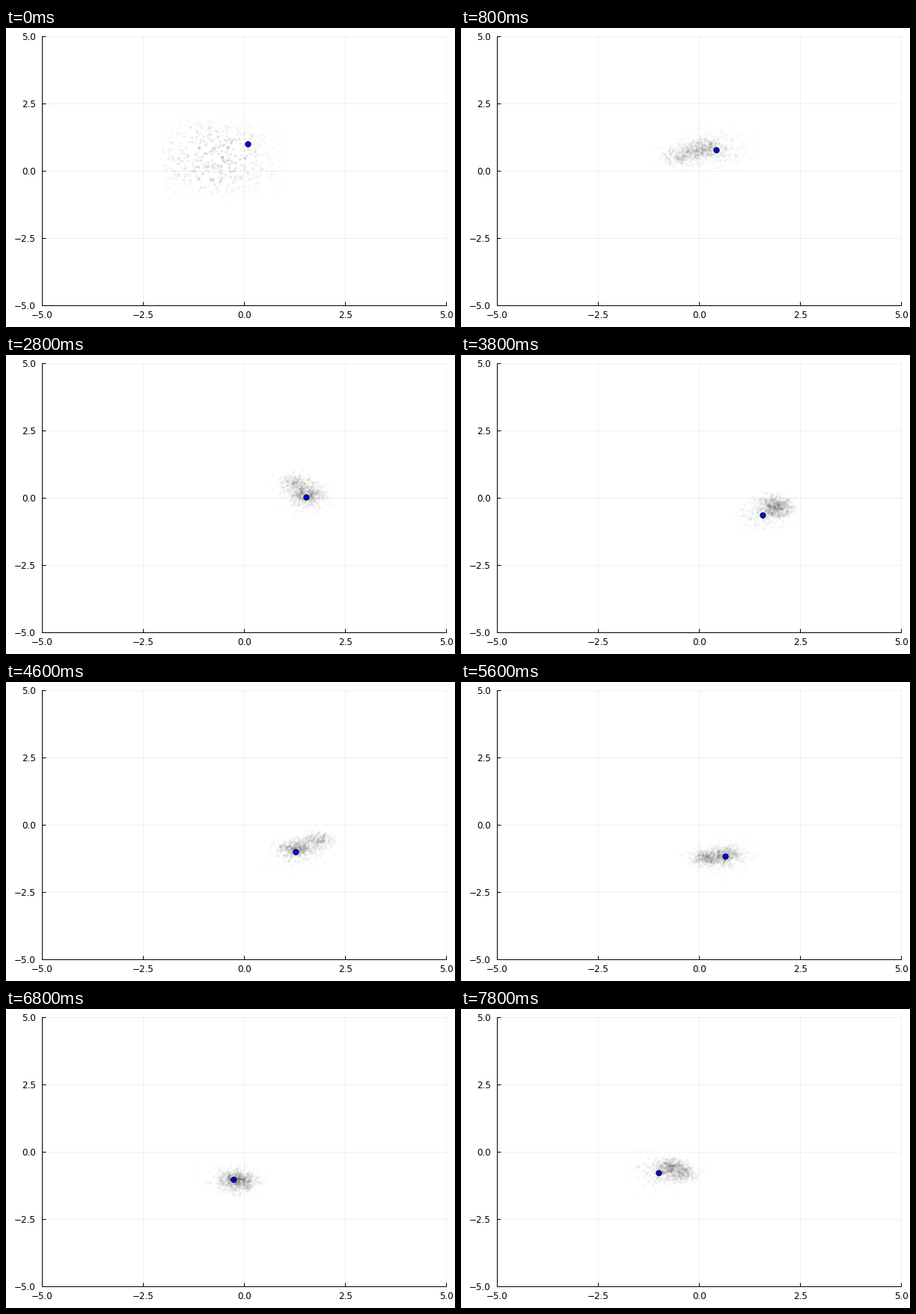
Recreate the animation shown at these times as a matplotlib script. Size 600x400 px, loop 8 s.

```python
import numpy as np
import matplotlib.pyplot as plt
from matplotlib.animation import FuncAnimation

W, H, DPI = 600, 400, 100
FRAMES, STEP_MS = 40, 200
PX = 72 / DPI  # one pixel in points
COUNT = 850

plt.rcParams.update({"font.family": "DejaVu Sans", "font.size": 12 * PX})

# Key points of the tracked point and of the densest part of the cloud
KEYS = np.array([0, 9, 14, 19, 28, 34, 39])
TRACK = np.array([(0.09, 1.0), (0.88, 0.47), (1.54, 0.03), (1.56, -0.64),
                  (0.64, -1.18), (-0.26, -1.03), (-1.0, -0.78)])
HEAD = np.array([(-0.7, 0.45), (0.95, 0.92), (1.55, 0.1), (1.97, -0.42),
                 (0.2, -1.25), (-0.2, -1.02), (-0.68, -0.58)])
LAG = 2.5  # frames by which the tail follows the head


def along(path, t):
    """Cubic Hermite curve through the key points."""
    slope = np.gradient(path, KEYS, axis=0)
    i = int(np.clip(np.searchsorted(KEYS, t, side="right") - 1,
                    0, len(KEYS) - 2))
    h = KEYS[i + 1] - KEYS[i]
    u = (t - KEYS[i]) / h
    return ((1 + 2 * u) * (1 - u) ** 2 * path[i]
            + u * (1 - u) ** 2 * h * slope[i]
            + u * u * (3 - 2 * u) * path[i + 1]
            - u * u * (1 - u) * h * slope[i + 1])


# Head, tail and the sparse halo around the tracked point
SPREAD = np.array([(0.23, 0.17), (0.23, 0.18), (0.34, 0.31)])
OPACITY = np.array([0.048, 0.038, 0.03])

rng = np.random.default_rng(12)
start = (rng.uniform([-2.0, -1.0], [1.0, 1.95], (COUNT, 2))
         + rng.normal(0, 0.07, (COUNT, 2)))
strength = rng.uniform(0.5, 1.4, COUNT)
group = rng.choice(3, COUNT, p=[0.4, 0.3, 0.3])

# Offsets wander a little from one frame to the next
drift = [rng.standard_normal((COUNT, 2))]
for _ in range(FRAMES - 1):
    drift.append(0.8 * drift[-1] + 0.6 * rng.standard_normal((COUNT, 2)))


def cloud(k):
    """Positions and opacities of the particles at frame k."""
    if k == 0:
        d2 = ((start - HEAD[0]) ** 2).sum(axis=1)
        return start, 0.09 * strength * np.exp(-d2 / 1.2)
    centre = np.array([along(HEAD, k), along(HEAD, max(k - LAG, 0)),
                       along(TRACK, k)])
    spread = SPREAD * (1 + np.exp(-k / 3))
    z = drift[k]
    alpha = OPACITY[group] * strength * np.exp(-(z ** 2).sum(axis=1) / 9)
    return centre[group] + spread[group] * z, alpha


fig = plt.figure(figsize=(W / DPI, H / DPI), dpi=DPI, facecolor="white")
ax = fig.add_axes([48.3 / W, 29 / H, 540 / W, 360 / H])
ticks = np.linspace(-5, 5, 5)
ax.set(xlim=(-5, 5), ylim=(-5, 5), xticks=ticks, yticks=ticks)
ax.set_axisbelow(True)
ax.grid(color="black", alpha=0.06, linewidth=PX, clip_on=False)
ax.tick_params(direction="in", length=5 * PX, width=PX)
ax.tick_params(axis="x", pad=6.8 * PX)
ax.tick_params(axis="y", pad=8.4 * PX)
for side, spine in ax.spines.items():
    spine.set_linewidth(PX)
    spine.set_visible(side in ("left", "bottom"))

dots = ax.scatter(*start.T, s=(3.6 * PX) ** 2, linewidths=0, zorder=3)
point, = ax.plot([], [], "o", ms=7.2 * PX, mfc="blue", mec="black",
                 mew=PX, zorder=4)


def draw(k):
    xy, alpha = cloud(k)
    colors = np.zeros((COUNT, 4))
    colors[:, 3] = alpha
    dots.set_offsets(xy)
    dots.set_facecolors(colors)
    x, y = along(TRACK, k)
    point.set_data([x], [y])
    return dots, point


anim = FuncAnimation(fig, draw, frames=FRAMES, interval=STEP_MS,
                     repeat=True, repeat_delay=0)
plt.show()
```
